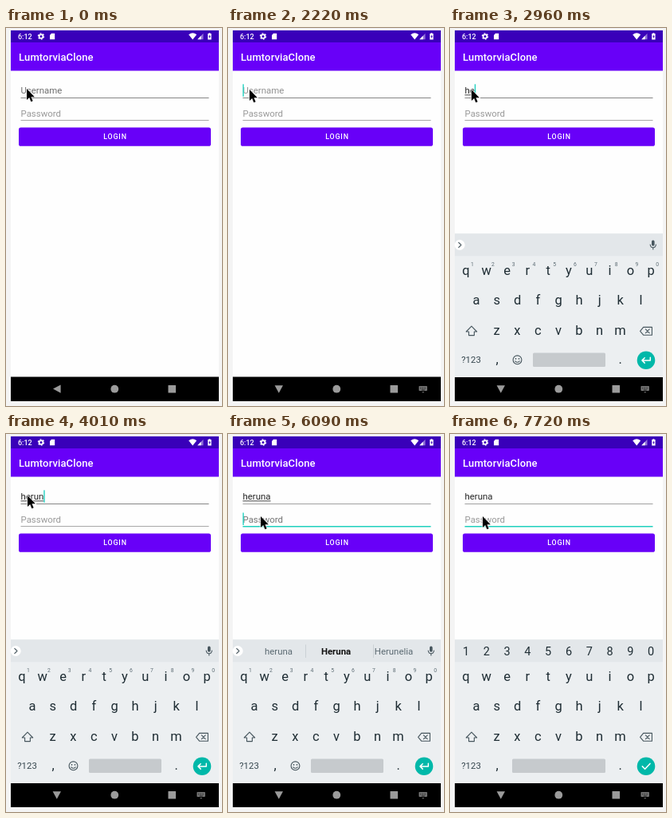
An HTML page for the animation above (8000 ms loop, 271x473 px).

```html
<!DOCTYPE html>
<html lang="en">
<head>
<meta charset="utf-8">
<title>Login form</title>
<style>
  html, body { margin: 0; width: 100%; height: 100%; overflow: hidden; background: #f4f4f4; }
  svg { display: block; width: 271px; height: 473px; font-family: Roboto, sans-serif; }
  text { white-space: pre; }
  .mid { text-anchor: middle; }
  .medium { font-weight: 500; fill: #fff; }
  .field { font-size: 11.43px; }
  .key { font-size: 16.5px; fill: #1f2d34; }
  .line { fill: none; stroke: #46555d; stroke-width: 1.1; stroke-linejoin: round; stroke-linecap: round; }
  .white { stroke: #fff; stroke-width: 1.5; }
</style>
</head>
<body>
<svg viewBox="0 0 271 473">
  <rect width="271" height="473" fill="#f4f4f4"/>
  <rect x="6" y="3" width="261" height="464" fill="#fefefe"/>
  <rect x="6" y="3" width="261" height="15.5" fill="#3900b9"/>
  <rect x="6" y="18" width="261" height="35.5" fill="#6800f8"/>

  <!-- status bar -->
  <text class="medium" x="15" y="14" font-size="9">6:12</text>
  <g fill="#fff">
    <circle cx="44" cy="10.5" r="2.4" fill="none" stroke="#fff" stroke-width="1.8"/>
    <circle cx="44" cy="10.5" r="3.7" fill="none" stroke="#fff" stroke-width="1.1" stroke-dasharray="1.9 1.97"/>
    <path d="M57 6.7H61.2V14.2H55V8.9Z"/>
    <path d="M229.2 8.2Q234.2 4.2 239.2 8.2L234.2 14.4Z"/>
    <path d="M247.5 6.8V14.2H240.3Z" opacity=".45"/>
    <path d="M244.6 9.8V14.2H240.3Z"/>
    <path d="M254.4 6.2H256.4V7H257.6V14.4H253.2V7H254.4Z"/>
    <path d="M255.8 8.2L254.2 11.2H255.2V13.2L256.8 10.2H255.8Z" fill="#3900b9"/>
  </g>

  <text class="medium" x="16" y="41" font-size="13" letter-spacing=".12">LumtorviaClone</text>

  <!-- form -->
  <text class="field" id="userHint" x="18.5" y="82.3">Username</text>
  <text class="field" id="user" x="18.5" y="82.3" fill="#262626"></text>
  <rect id="compose" x="18.5" y="83.4" height=".9" fill="#333"/>
  <rect id="userLine" x="18.5" y="87" width="236" height="1"/>
  <text class="field" id="passHint" x="18.5" y="110.8">Password</text>
  <rect id="passLine" x="18.5" width="236"/>
  <rect id="caret" width="1.3" height="15.5" fill="#14cfbd"/>
  <rect x="16" y="124.5" width="241" height="23.3" rx="2.6" fill="#6800f8"/>
  <text class="medium mid" x="137" y="139.4" font-size="8.9" letter-spacing=".8">LOGIN</text>

  <!-- navigation bar -->
  <rect x="6" y="436.5" width="261" height="30.5" fill="#000"/>
  <g fill="#9b9b9b">
    <path id="back" d="M59 451.6L68.6 446.4V456.8Z"/>
    <circle cx="136.3" cy="451.7" r="4.9"/>
    <rect x="203.5" y="447" width="9.6" height="9.6" rx=".6"/>
  </g>
  <g id="imeIcon">
    <rect x="239.5" y="448" width="10.4" height="6" rx=".8" fill="#777"/>
    <path d="M241 449.8H248.6M241 451.4H248.6" stroke="#000" stroke-width=".7" stroke-dasharray=".8 .8"/>
    <path d="M242.8 453H246.8" stroke="#000" stroke-width=".7"/>
    <path d="M243.2 455.2H246.4L244.8 456.8Z" fill="#777"/>
  </g>

  <!-- keyboard -->
  <g id="board">
    <rect x="6" y="257.3" width="261" height="179.7" fill="#eceff1"/>
    <rect x="6" y="257.3" width="261" height="28" fill="#e3e7ea"/>
    <g id="keys"></g>
    <path class="line" d="M27 373.2L20.3 380H23.6V384.6H30.4V380H33.7Z"/>
    <path class="line" d="M242.6 374.4H253.4V384.2H242.6L238.6 379.3Z"/>
    <path class="line" d="M245.4 376.9L250.2 381.7M250.2 376.9L245.4 381.7"/>
    <text class="mid" x="26.5" y="419.3" font-size="11.4" fill="#37474f">?123</text>
    <rect id="space" y="406.5" height="17.5" rx="1.5" fill="#c6cacd"/>
    <circle cx="246" cy="415.7" r="11.3" fill="#00b8a9"/>
    <g id="textMode">
      <g id="hints"></g>
      <circle cx="12.2" cy="271.5" r="6.5" fill="#fff"/>
      <path class="line" d="M10.8 268.4L14 271.5L10.8 274.6" stroke-width="1.4"/>
      <g>
        <rect x="253" y="265.6" width="3.6" height="7.2" rx="1.8" fill="#46555d"/>
        <path class="line" d="M251.2 271Q251.6 274.7 254.8 274.7T258.4 271M254.8 274.8V277"/>
      </g>
      <circle class="line" cx="84.5" cy="415.3" r="5.4"/>
      <g fill="#46555d"><circle cx="82.5" cy="413.8" r=".9"/><circle cx="86.5" cy="413.8" r=".9"/></g>
      <path class="line" d="M81.8 416.9Q84.5 419.6 87.2 416.9"/>
      <path class="line white" d="M251.3 412.2V415.9H241.2M244.2 412.7L241 415.9L244.2 419.1"/>
      <g id="suggest" font-size="11.4" fill="#5b6a72">
        <path d="M97.5 263.5V280M182.5 263.5V280" stroke="#cbd1d5"/>
        <text class="mid" x="63.5" y="275.6">heruna</text>
        <text class="mid" x="135.5" y="275.6" font-weight="700" fill="#111">Heruna</text>
        <text class="mid" x="208" y="275.6">Herunelia</text>
      </g>
    </g>
    <g id="passMode">
      <g id="digits"></g>
      <path class="line white" d="M241.3 415.9L244.6 419.2L251 412.4"/>
    </g>
  </g>

  <path id="mouse" d="M0 0V14L3.2 11L5.4 16.2L7.7 15.2L5.5 10.3H9.9Z" fill="#000" stroke="#fff" stroke-width="1.3" paint-order="stroke"/>
</svg>
<script>
const LOOP = 8000, LEFT = 18.5, PITCH = 25.8, NAME = 'heruna';
const $ = id => document.getElementById(id);

function set(id, attrs) {
  for (const k in attrs) $(id).setAttribute(k, attrs[k]);
}

function label(parent, str, x, y, attrs = {}) {
  const el = document.createElementNS('http://www.w3.org/2000/svg', 'text');
  el.textContent = str;
  el.setAttribute('class', 'mid key');
  el.setAttribute('x', x);
  el.setAttribute('y', y);
  for (const k in attrs) el.style[k] = attrs[k];
  $(parent).append(el);
}

function row(parent, chars, x, y, attrs) {
  [...chars].forEach((c, i) => label(parent, c, x + i * PITCH, y, attrs));
}

row('keys', 'qwertyuiop', 20, 309);
row('keys', 'asdfghjkl', 33, 346.3);
row('keys', 'zxcvbnm', 58.6, 384.3);
label('keys', ',', 59, 419.5);
label('keys', '.', 213.6, 419.5);
row('hints', '1234567890', 28, 297.5, { fontSize: '6.8px', fill: '#5f6e76' });
row('digits', '1234567890', 20, 277, { fontSize: '14.5px' });

// How many of the given moments have passed
const passed = (t, times) => times.filter(m => t >= m).length;
const within = (t, spans) => spans.some(([a, b]) => t >= a && t < b);

const TYPED = [2670, 2960, 3410, 3710, 4010, 4600];
const TURN = [1640, 1790, 1930, 2080, 2220];
const CARET = [[150, 890], [1640, 5200], [5650, 6680], [7120, 7720]];
const MOUSE = [[26, 76], [27, 77], [35, 92], [41, 103]];

function draw(t) {
  const onPass = t >= 6090, secret = t >= 6680;

  // form
  const count = passed(t, TYPED);
  $('user').textContent = NAME.slice(0, count);
  const width = count ? $('user').getComputedTextLength() : 0;
  set('userHint', { fill: t < 300 ? '#6f6f6f' : '#929292', opacity: count ? 0 : 1 });
  set('compose', { width, opacity: t < 6230 ? 1 : 0 });
  set('userLine', { fill: onPass ? '#a0a0a0' : '#858585' });
  set('passHint', { fill: within(t, [[6090, 6230]]) ? '#747474' : '#999' });
  set('passLine', onPass
    ? { y: 115, height: 1.5, fill: '#1fd0be' }
    : { y: 115, height: 1, fill: '#a8a8a8' });
  set('caret', {
    x: onPass ? LEFT : LEFT + width,
    y: onPass ? 98.5 : 70.3,
    opacity: within(t, CARET) ? 1 : 0
  });

  // navigation bar
  const turn = passed(t, TURN) / TURN.length;
  set('back', { transform: `rotate(${-90 * turn} 64 451.8)` });
  set('imeIcon', { opacity: turn });

  // keyboard
  const rising = t < 2820;
  set('board', {
    transform: `translate(0 ${rising ? 5 : 0})`,
    opacity: t < 2670 ? 0 : rising ? 0.8 : 1
  });
  set('textMode', { opacity: secret ? 0 : 1 });
  set('passMode', { opacity: secret ? (t < 6820 ? 0.6 : 1) : 0 });
  set('space', secret ? { x: 78, width: 117 } : { x: 104, width: 91 });
  set('suggest', { opacity: within(t, [[5650, 6230]]) ? (t < 5790 ? 0.4 : 1) : 0 });

  set('mouse', { transform: `translate(${MOUSE[passed(t, [150, 5050, 5200])]})` });
}

const start = performance.now();
function tick(now) {
  draw(Math.max(0, now - start) % LOOP);
  requestAnimationFrame(tick);
}
draw(0);
requestAnimationFrame(tick);
</script>
</body>
</html>
```
